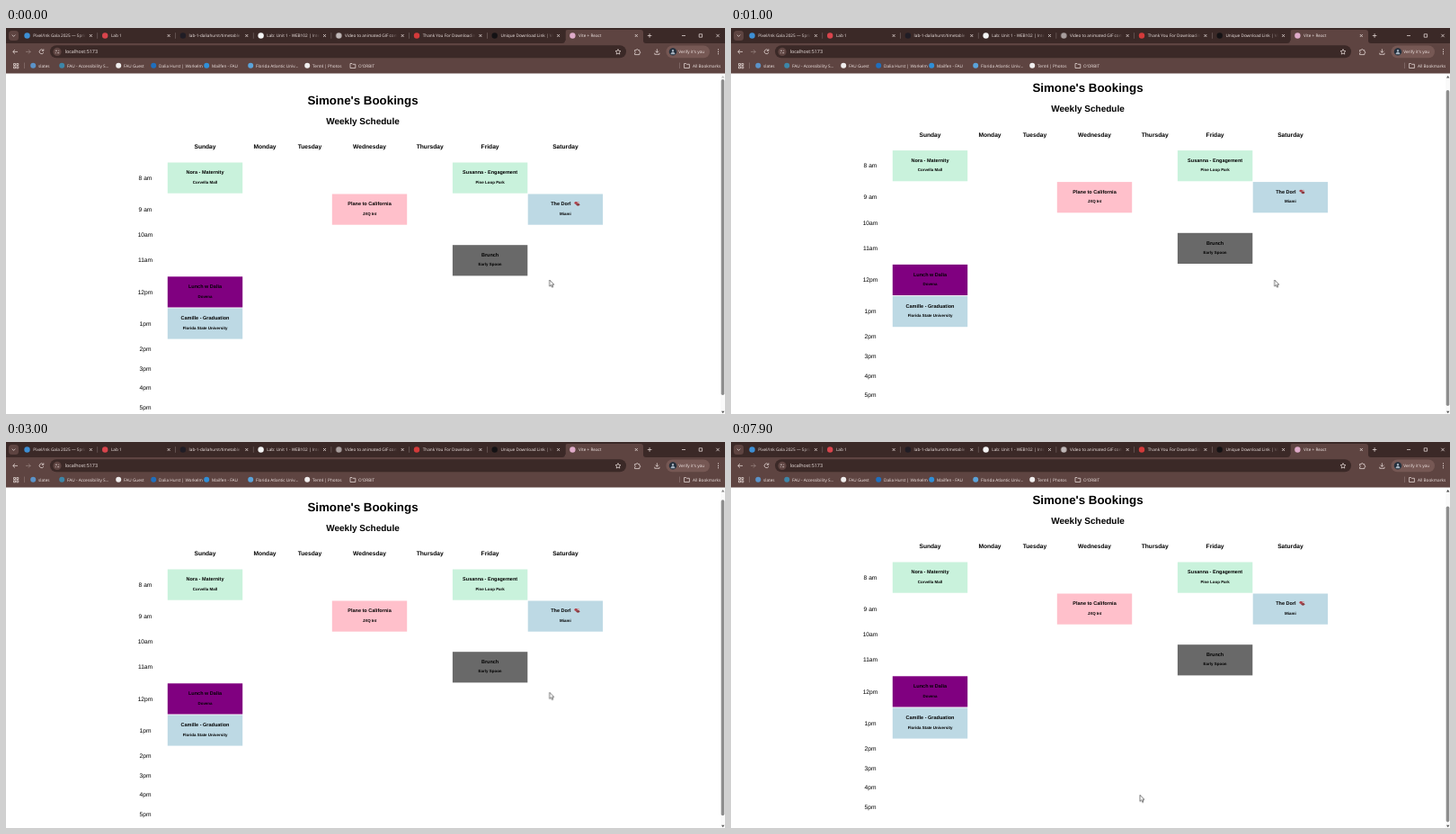
Recreate the animation shown at these times as an HTML page. Size 800 by 429 pixels, loop 8000 ms.

```html
<!DOCTYPE html>
<html lang="en">
<head>
<meta charset="utf-8">
<title>Weekly Schedule</title>
<style>
  html, body { margin: 0; width: 100%; height: 100%; overflow: hidden; background: #fff; }
  svg { display: block; width: 800px; height: 429px; text-rendering: geometricPrecision; }
  #page { font-family: "Liberation Sans", Arial, sans-serif; text-anchor: middle; }
  #chrome { font: 4.7px "Open Sans", sans-serif; fill: #f3e9e7; }
  .h1 { font: bold 13.33px "Liberation Sans", Arial, sans-serif; }
  .h2 { font: bold 10px "Liberation Sans", Arial, sans-serif; }
  .day { font-size: 6.67px; font-weight: bold; }
  .hour { font-size: 6.67px; }
  .name { font-size: 5.53px; font-weight: bold; }
  .place { font-size: 4.467px; font-weight: bold; }
  .line { fill: none; stroke: #eadedb; stroke-width: .75; }

  #view { --s: 0; animation: scroll 8s step-end infinite; }
  #page { transform: translateY(calc(var(--s) * -1px)); }
  #thumb { transform: translateY(calc(var(--s) * .9px)); }
  #up { fill-opacity: calc(.3 + var(--s) * .04); }
  #cursor { animation: point 8s step-end infinite; }
  #spin { animation: pulse 8s step-end infinite; }

  @keyframes scroll {
    0% { --s: 0; }
    11.25% { --s: 5; }
    12.5% { --s: 13.4; }
    13.75% { --s: 16; }
    37.5% { --s: 8; }
    38.75% { --s: 0; }
    86.25%, 100% { --s: 16; }
  }
  @keyframes point {
    0% { transform: translate(604.7px, 280px); }
    30% { transform: translate(604.7px, 278.3px); }
    86.25% { transform: translate(455px, 394px); }
    91.25% { transform: translate(455px, 393px); }
    93.75%, 100% { transform: translate(455px, 392.3px); }
  }
  @keyframes pulse {
    0% { opacity: .85; }
    12.5% { opacity: .7; }
    38.75% { opacity: .45; }
    86.25% { opacity: .55; }
    93.75%, 100% { opacity: .85; }
  }
</style>
</head>
<body>
<svg viewBox="0 0 800 429">
  <defs>
    <linearGradient id="fade"><stop offset="0" stop-color="#3b2927" stop-opacity="0"/><stop offset=".8" stop-color="#3b2927"/></linearGradient>
  </defs>
  <rect width="800" height="429" fill="#fff"/>
  <g id="view">
    <g id="page">
      <text class="h1" x="397" y="84.7">Simone's Bookings</text>
      <text class="h2" x="397" y="106.6">Weekly Schedule</text>
    </g>
    <rect x="795" y="50" width="5" height="379" fill="#fafafa"/>
    <rect id="thumb" x="795.7" y="57" width="3.6" height="351" rx="1.8" fill="#8d8d8d"/>
    <path id="up" d="M796 55.5h3.4l-1.7-2.6z" fill="#333"/>
    <path d="M796 425.8h3.4l-1.7 2.4z" fill="#555"/>
  </g>

  <g id="chrome">
    <rect width="800" height="18" fill="#3b2927"/>
    <rect y="17" width="800" height="33.5" fill="#5e4441"/>
    <path d="M619 17q3 0 3-3V5q0-3 3-3h81q3 0 3 3v9q0 3 3 3z" fill="#5e4441"/>
    <rect x="3" y="3" width="11" height="11" rx="3.5" fill="#5e4441"/>
    <path class="line" d="M6.7 7.6l1.8 1.8 1.8-1.8"/>
    <g id="tabs"></g>
    <path class="line" d="M713.8 8.5h4.6M716.1 6.2v4.6M752 8.5h4M771.2 6.8h3.4v3.4h-3.4zM790.3 6.8l3.4 3.4M793.7 6.8l-3.4 3.4"/>

    <rect x="49" y="19.3" width="641" height="14" rx="7" fill="#3b2927"/>
    <path class="line" d="M13 26.4H7.8M10 24.1l-2.3 2.3 2.3 2.3"/>
    <path class="line" d="M22 26.4h5.2M24.9 24.1l2.3 2.3-2.3 2.3" opacity=".4"/>
    <path class="line" d="M41.3 24.7a2.4 2.4 0 1 0 .5 2.4M41.8 23.4v2h-2"/>
    <circle cx="57" cy="26.4" r="4.6" fill="#5e4441"/>
    <path class="line" d="M54.8 25.2h2.2M58.2 25.2h1M54.8 27.7h1M57.2 27.7h2"/>
    <text x="65.7" y="28.4" font-size="5.4">localhost:5173</text>
    <path class="line" d="M681 23.6l.9 1.9 2 .2-1.5 1.4.4 2-1.8-1-1.8 1 .4-2-1.5-1.4 2-.2z"/>
    <path class="line" d="M699.6 24.6h1.7a1 1 0 0 1 2 0h1.5v1.6a1 1 0 0 1 0 2v1.4h-5.2v-1.6a1 1 0 0 0 0-1.9z"/>
    <path class="line" d="M724.4 23.4v3.8M722.6 25.6l1.8 1.8 1.8-1.8M721.8 27.7v1.6h5.2v-1.6"/>
    <rect x="734.5" y="19.6" width="48.5" height="13.6" rx="6.8" fill="#765854"/>
    <circle cx="742" cy="26.4" r="4.2" fill="#25303d"/>
    <path d="M739.6 29.3q0-2.6 2.4-2.6t2.4 2.6zM740.8 25.2a1.2 1.2 0 1 0 2.4 0a1.2 1.2 0 1 0-2.4 0" fill="#a5b2bf"/>
    <text x="748.3" y="28.1">Verify it's you</text>
    <path d="M792 23.5h1v1h-1zM792 25.9h1v1h-1zM792 28.3h1v1h-1z"/>

    <path class="line" d="M8.5 39.5h2v2h-2zM11.8 39.5h2v2h-2zM8.5 42.8h2v2h-2zM11.8 42.8h2v2h-2z"/>
    <path d="M20 38.5h.6v6.5h-.6zM749 38.5h.6v6.5h-.6z" opacity=".35"/>
    <g id="marks"></g>
    <text x="764" y="43.5">All Bookmarks</text>
  </g>
  <path id="cursor" d="M0 0v7.2l1.7-1.5 1.1 2.5 1.2-.5-1.1-2.5h2.1z" fill="#fff" stroke="#222" stroke-width=".6"/>
</svg>
<script>
  const svgNS = "http://www.w3.org/2000/svg";
  const layer = id => document.getElementById(id);

  function add(parent, tag, attrs, text) {
    const el = document.createElementNS(svgNS, tag);
    for (const key in attrs) el.setAttribute(key, attrs[key]);
    if (text) el.textContent = text;
    parent.append(el);
    return el;
  }

  // Timetable
  const page = layer("page");
  const label = (cls, x, y, text) => add(page, "text", { class: cls, x, y }, text);

  const days = { Sunday: 221.5, Monday: 288, Tuesday: 338, Wednesday: 404.5, Thursday: 471.7, Friday: 538.6, Saturday: 622.4 };
  for (const day in days) label("day", days[day], 134.4, day);

  const hours = { "8 am": 166.5, "9 am": 201.5, "10am": 230, "11am": 258.2, "12pm": 293.3, "1pm": 328.4, "2pm": 356.7, "3pm": 378.4, "4pm": 400, "5pm": 421.7 };
  for (const hour in hours) label("hour", 155, hours[hour] + 2.2, hour);

  const mint = "#c9f2dc", blue = "#bdd9e4";
  const events = [
    ["Sunday", "8 am", mint, "Nora - Maternity", "Corvella Mall"],
    ["Friday", "8 am", mint, "Susanna - Engagement", "Pine Loop Park"],
    ["Wednesday", "9 am", "#ffc0cb", "Plane to California", "JXQ Int"],
    ["Saturday", "9 am", blue, "The Dorl", "Miami"],
    ["Friday", "11am", "#696969", "Brunch", "Early Spoon"],
    ["Sunday", "12pm", "#800080", "Lunch w Dalia", "Dovena"],
    ["Sunday", "1pm", blue, "Camille - Graduation", "Florida State University"]
  ];
  for (const [day, hour, fill, name, place] of events) {
    const x = days[day], y = hours[hour] - 17;
    add(page, "rect", { x: x - 41.7, y, width: 83.4, height: 34.2, fill });
    label("name", day === "Saturday" ? x - 5 : x, y + 12.9, name);
    label("place", x, y + 23.2, place);
  }
  // Small emoji beside the Saturday entry
  add(page, "ellipse", { cx: 634.2, cy: 194.5, rx: 1.8, ry: 1.4, fill: "#b0414b" });
  add(page, "ellipse", { cx: 636.4, cy: 196.3, rx: 1.9, ry: 1.4, fill: "#8a3b40" });
  add(page, "circle", { cx: 636.9, cy: 193.9, r: .8, fill: "#d98a86" });

  // Browser tabs
  const tabs = [
    ["#3d8fd4", "Pixel/Ink Gala 2025 — Spring"],
    ["#d9444c", "Lab 1"],
    ["#201d25", "lab-1-daliahurst/timetable"],
    ["#f4f4f4", "Lab: Unit 1 - WEB102 | Inter"],
    ["#d8d2d2", "Video to animated GIF conv"],
    ["#d33a3a", "Thank You For Downloading"],
    ["#141214", "Unique Download Link | Ve"],
    ["#dfabc9", "Vite + React"]
  ];
  const strip = layer("tabs");
  tabs.forEach(([fill, title], i) => {
    const x = 86.7 * i, tab = add(strip, "g", { transform: `translate(${x} 0)` });
    const icon = add(tab, "circle", { cx: 23.5, cy: 8.5, r: 3.2, fill });
    if (i === 4) icon.id = "spin";
    add(tab, "text", { x: 30.2, y: 10.3 }, title);
    if (i < 7) {
      add(tab, "rect", { x: 80, y: 3, width: 11, height: 11, fill: "url(#fade)" });
      add(tab, "rect", { x: 90.5, y: 3, width: 12, height: 11, fill: "#3b2927" });
      if (i < 6) add(tab, "rect", { x: 101.5, y: 5.2, width: .6, height: 6.6, opacity: .35 });
    }
    add(tab, "path", { class: "line", d: "M92.9 7l3 3M95.9 7l-3 3" });
  });

  // Bookmarks
  const marks = layer("marks");
  const folder = x => add(marks, "path", { class: "line", d: `M${x} 39.5h2l.8.8h3v4.2h-5.8z` });
  const bookmarks = [
    [36, "#5b93c9", "slates"],
    [68, "#3d86a8", "FAU - Accessibility S..."],
    [131, "#f0eeee", "FAU Guest"],
    [170, "#1f6fbe", "Dalia Hurst | Workelm"],
    [229, "#2f8fd8", "Mailfen - FAU"],
    [278, "#5aa3da", "Florida Atlantic Univ..."],
    [341, "#f0eeee", "Tent4 | Photos"],
    [392, null, "O'ORBIT"]
  ];
  for (const [x, fill, text] of bookmarks) {
    if (fill) add(marks, "circle", { cx: x - 5.8, cy: 41.8, r: 3, fill });
    else folder(x - 9);
    add(marks, "text", { x, y: 43.5 }, text);
  }
  folder(754.6);
</script>
</body>
</html>
```
